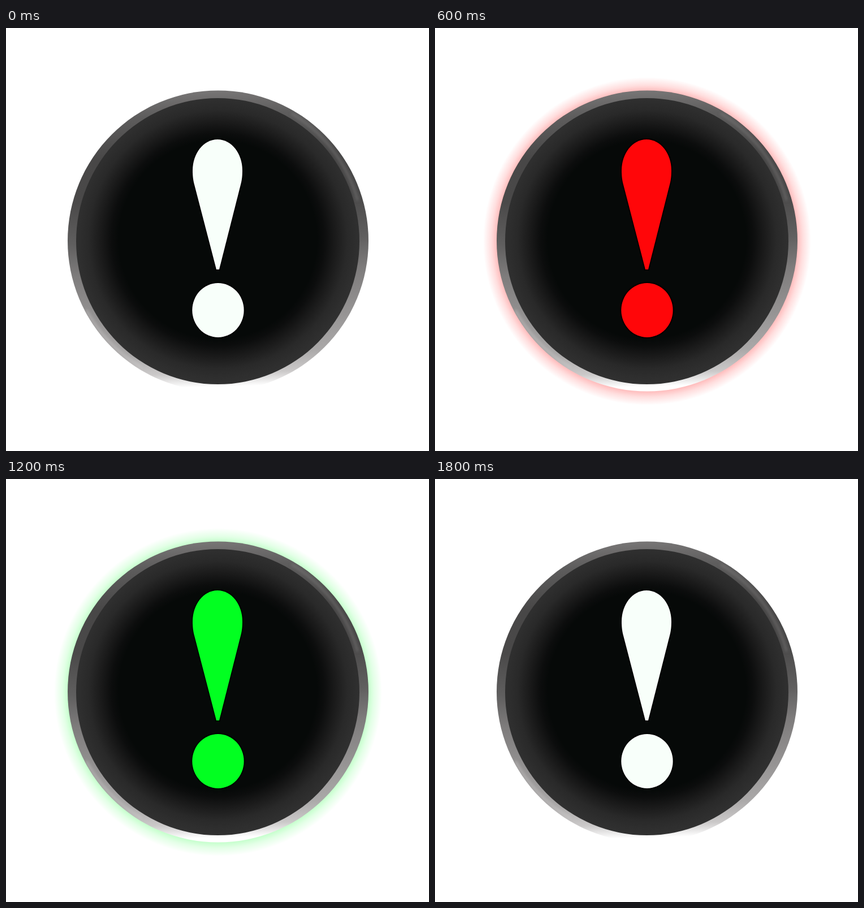
Recreate the animation shown at these times as an HTML page. Size 748 by 748 pixels, loop 1.9 s.

```html
<!DOCTYPE html>
<html lang="en">
<head>
<meta charset="utf-8">
<title>Signal button</title>
<style>
html, body { margin: 0; width: 100%; height: 100%; overflow: hidden; background: #fff; }
svg { display: block; width: 100vw; height: 100vh; }
</style>
</head>
<body>
<svg viewBox="0 0 748 748">
  <defs>
    <linearGradient id="rim" gradientUnits="userSpaceOnUse" x1="360" y1="111" x2="375" y2="642">
      <stop offset="0" stop-color="#777575"/>
      <stop offset=".08" stop-color="#5e5d5d"/>
      <stop offset=".22" stop-color="#484747"/>
      <stop offset=".36" stop-color="#4a4949"/>
      <stop offset=".5" stop-color="#605f5f"/>
      <stop offset=".6" stop-color="#7d7b7b"/>
      <stop offset=".74" stop-color="#949292"/>
      <stop offset=".87" stop-color="#aaa8a8"/>
      <stop offset=".94" stop-color="#cbc9c9"/>
      <stop offset=".985" stop-color="#fff"/>
    </linearGradient>
    <radialGradient id="face" gradientUnits="userSpaceOnUse" cx="374.5" cy="374" r="254">
      <stop offset=".69" stop-color="#060908"/>
      <stop offset=".74" stop-color="#0c0d0d"/>
      <stop offset=".82" stop-color="#1b1b1b"/>
      <stop offset=".9" stop-color="#292929"/>
      <stop offset=".96" stop-color="#2e2e2e"/>
      <stop offset="1" stop-color="#303030"/>
    </radialGradient>
    <radialGradient id="redHalo" gradientUnits="userSpaceOnUse" cx="375" cy="377" r="290">
      <stop offset=".9" stop-color="#f00" stop-opacity=".32"/>
      <stop offset=".95" stop-color="#f00" stop-opacity=".13"/>
      <stop offset="1" stop-color="#f00" stop-opacity="0"/>
    </radialGradient>
    <radialGradient id="greenHalo" gradientUnits="userSpaceOnUse" cx="375" cy="377" r="290">
      <stop offset=".9" stop-color="#02ff21" stop-opacity=".28"/>
      <stop offset=".95" stop-color="#02ff21" stop-opacity=".11"/>
      <stop offset="1" stop-color="#02ff21" stop-opacity="0"/>
    </radialGradient>
    <filter id="soft" x="-20%" y="-20%" width="140%" height="140%">
      <feGaussianBlur stdDeviation="2.5"/>
    </filter>
    <clipPath id="disc"><circle cx="375" cy="376.5" r="266"/></clipPath>
    <g id="mark">
      <path d="M374 197C399 197 418 222 418 252C418 262 417 268 416 273L377 427H372L332 273C331 268 330 262 330 252C330 222 349 197 374 197Z"/>
      <ellipse cx="375" cy="499" rx="45.7" ry="48"/>
    </g>
  </defs>

  <circle id="redGlow" cx="375" cy="377" r="290" fill="url(#redHalo)"/>
  <circle id="greenGlow" cx="375" cy="377" r="290" fill="url(#greenHalo)"/>

  <circle cx="375" cy="376.5" r="266" fill="url(#rim)"/>
  <g clip-path="url(#disc)" fill="none" filter="url(#soft)">
    <path d="M142 499A260 260 0 0 0 240 600" stroke="#d0cece" stroke-width="4" opacity=".5"/>
    <path d="M505 151A260 260 0 0 1 622 305" stroke="#858383" stroke-width="4" opacity=".5"/>
  </g>
  <ellipse cx="374.5" cy="377" rx="250.5" ry="253" fill="url(#face)"/>

  <use href="#mark" fill="#060908" stroke="#000" stroke-width="4"/>
  <use id="white" href="#mark" fill="#f8fffa"/>
  <use id="red" href="#mark" fill="#ff0609"/>
  <use id="green" href="#mark" fill="#02ff21"/>
</svg>
<script>
const LOOP = 1900, STEP = 100, FADE = 6;
const setAlpha = (id, a) => document.getElementById(id).setAttribute("opacity", a);

// Strength of a colour that peaks at the given step.
const level = (k, peak) => Math.max(0, 1 - Math.abs(k - peak) / FADE);

// Halos come in late and leave more evenly.
const halo = (k, peak) => Math.pow(level(k, peak), k < peak ? 3 : 1.5);

function draw(ms) {
  const k = Math.floor((ms % LOOP) / STEP);
  setAlpha("white", Math.max(level(k, 0), level(k, 3 * FADE)));
  setAlpha("red", level(k, FADE));
  setAlpha("green", level(k, 2 * FADE));
  setAlpha("redGlow", halo(k, FADE));
  setAlpha("greenGlow", halo(k, 2 * FADE));
}

const start = performance.now();
function tick() {
  draw(performance.now() - start);
  requestAnimationFrame(tick);
}
tick();
</script>
</body>
</html>
```
